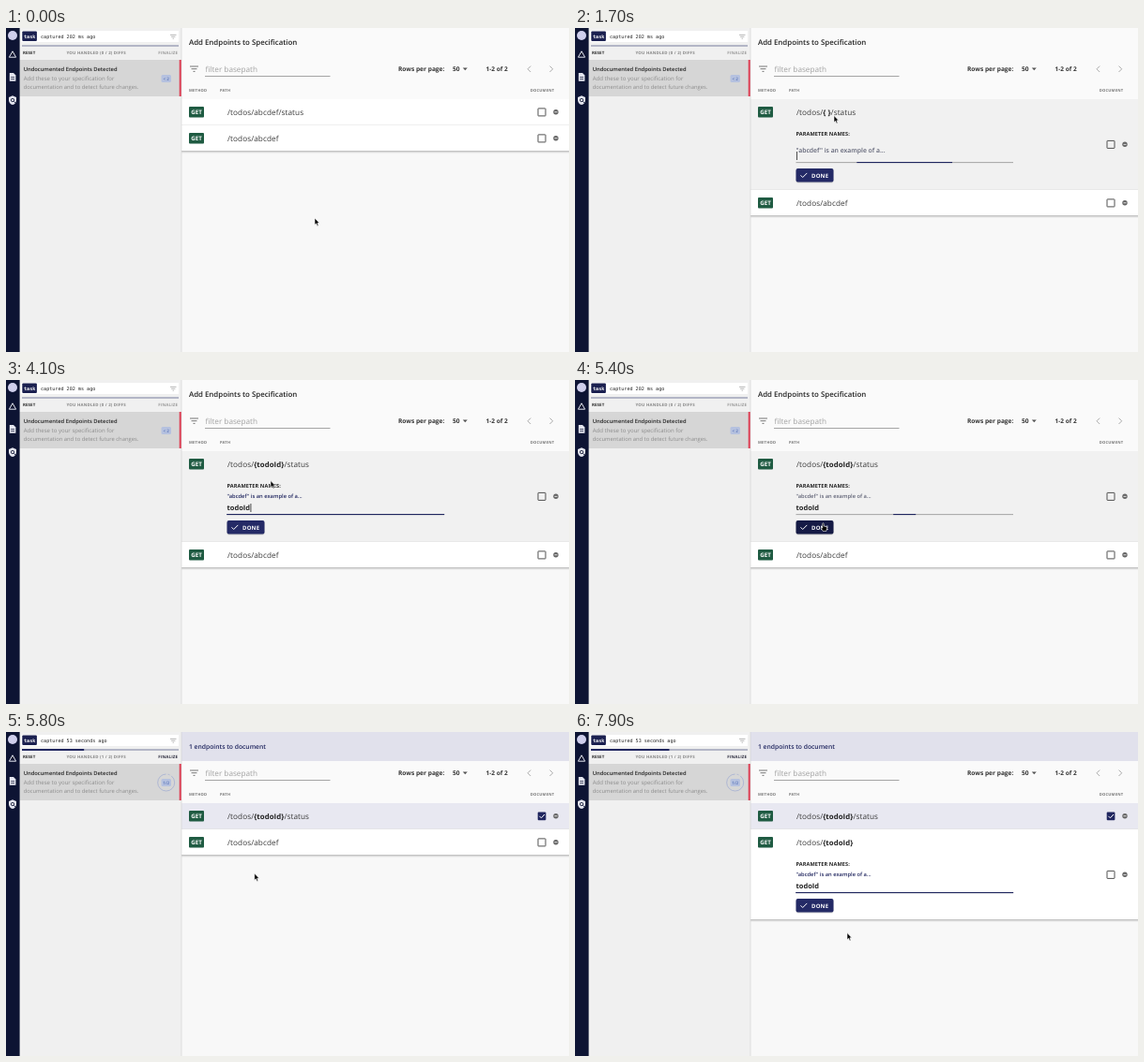
An HTML page that plays this animation: 600 px wide and 346 px high, repeating every 8000 ms.

```html
<!DOCTYPE html>
<html lang="en">
<head>
<meta charset="utf-8">
<title>Add endpoints</title>
<style>
html, body { margin: 0; width: 100%; height: 100%; overflow: hidden; }
svg { display: block; width: 600px; height: 346px; text-rendering: geometricPrecision;
  font-family: "Open Sans", "Noto Sans", sans-serif; }
.mono { font-family: "DejaVu Sans Mono", monospace; }
text { white-space: pre; }
</style>
</head>
<body>
<svg id="stage" viewBox="0 0 600 346"></svg>
<script>
const stage = document.getElementById('stage');
const NAVY = '#20265f', INK = '#2b2b2b', GREY = '#8c8c8c';

// When things happen, in ms
const OPEN1 = 1667, BLUR = 5282, SAVE = 5483, OPEN2 = 6967;
const KEYS = [2500, 2700, 2900, 3000, 3300, 3700];
const NAME = 'todoId';
const PATH = [[200, 329, 203], [900, 276, 93.5], [3800, 276, 93.5], [4100, 282, 107.5],
  [5200, 264, 153], [5700, 265, 154], [6300, 262, 114], [6950, 262, 114], [7900, 290, 214.5]];

const clamp = v => Math.max(0, Math.min(1, v));
const mix = (a, b, p) => a + (b - a) * p;

// cubic-bezier(0, 0, .2, 1)
function easeOut(x) {
  x = clamp(x);
  let lo = 0, hi = 1;
  for (let i = 0; i < 20; i++) {
    const s = (lo + hi) / 2;
    if (.6 * (1 - s) * s * s + s ** 3 < x) lo = s; else hi = s;
  }
  return 3 * (1 - lo) * lo * lo + lo ** 3;
}

function pointer(t) {
  let [t0, x0, y0] = PATH[0];
  for (const [t1, x1, y1] of PATH) {
    if (t < t1) {
      const p = clamp((t - t0) / (t1 - t0)), e = p * p * (3 - 2 * p);
      return [mix(x0, x1, e), mix(y0, y1, e)];
    }
    [t0, x0, y0] = [t1, x1, y1];
  }
  return [x0, y0];
}

const rect = (x, y, w, h, fill, more = '') =>
  `<rect x="${x}" y="${y}" width="${w}" height="${h}" fill="${fill}" ${more}/>`;
const line = (d, stroke, w = 1) => `<path d="${d}" fill="none" stroke="${stroke}" stroke-width="${w}"/>`;
const text = (x, y, size, s, fill = INK, weight = 400, more = '') =>
  `<text x="${x}" y="${y}" font-size="${size}" fill="${fill}" font-weight="${weight}" ${more}>${s}</text>`;
const spaced = n => `letter-spacing="${n}"`;
const filterIcon = (x, y, w, c) =>
  line(`M${x} ${y}h${w}M${x + w * .17} ${y + w * .3}h${w * .66}M${x + w * .39} ${y + w * .6}h${w * .22}`, c, w / 9);

function sidebar() {
  return rect(0, 0, 14.6, 346, '#0d1433') +
    '<circle cx="7" cy="8" r="5" fill="#cfcfec"/>' +
    line('M7 24.8L10.6 31.2H3.4Z', '#e4e6ef', 1) +
    '<path d="M3.8 48h4.2l2.4 2.4v6.4h-6.6z" fill="#e4e6ef"/>' + line('M5.2 52.5h3.8M5.2 54.5h3.8', '#0d1433', .7) +
    '<path d="M7 72.2l4 1.7v3c0 2.6-1.7 4.4-4 5.2c-2.3-.8-4-2.6-4-5.2v-3z" fill="#e4e6ef"/>' +
    '<circle cx="7" cy="77" r="1.7" fill="none" stroke="#0d1433" stroke-width=".8"/>' + line('M8.2 78.2l1.8 1.8', '#0d1433', .8);
}

function diffs(t) {
  const saved = t >= SAVE, done = clamp((t - SAVE) / 400);
  let s = rect(14, 0, 173, 346, '#f0f0f0') + rect(16, 3, 168, 12, '#fff') +
    rect(17.3, 3.6, 15.6, 10.4, '#1b2050', 'rx="1"') +
    text(19, 10.6, 5.1, 'task', '#fff', 700, 'class="mono"') +
    text(37, 10.8, 5.1, `captured ${saved ? '53 seconds' : '202 ms'} ago`, '#222', 400, 'class="mono"') +
    filterIcon(175, 7.3, 6.5, '#9a9a9a') +
    rect(17, 18, 167, 2, '#b3b6c6') + rect(17, 18, 83.5 * done, 2, NAVY) +
    text(18, 28, 4.4, 'RESET', '#2a2a2a', 700, spaced(.1)) +
    text(64.5, 28, 4.4, `YOU HANDLED (${+saved} / 2) DIFFS`, '#858585', 700, spaced(.2)) +
    text(162.3, 28, 4.4, 'FINALIZE', saved ? '#2a2a3c' : '#9a9a9a', 700, spaced(.18)) +
    rect(14, 34, 173, 39, '#d6d6d6') + rect(184.7, 34, 2.3, 39, '#df3f55') +
    text(18.7, 46, 5.8, 'Undocumented Endpoints Detected', '#222', 600) +
    text(18.7, 56, 6.05, 'Add these to your specification for', GREY) +
    text(18.7, 65.3, 5.82, 'documentation and to detect future changes.', GREY);
  if (saved) s += '<circle cx="170.7" cy="54" r="9" fill="none" stroke="#aab4d3" stroke-width=".9" stroke-dasharray="42 2 2 2"/>';
  s += rect(165.5, 50, 10.5, 8, '#b5c1df', 'rx="1.5"') +
    text(170.7, 55.8, 4.6, saved ? '1/2' : '&lt; 2', '#5a74b8', 600, 'text-anchor="middle"');
  return s;
}

function toolbar(t) {
  const tint = clamp((t - SAVE) / 300), saved = t >= SAVE;
  return rect(187, 0, 413, 346, '#f8f8f8') + rect(187, 0, 413, 76, '#fafafa') +
    rect(187, 0, 413, 31, '#e1e1ec', `opacity="${tint}"`) +
    (saved ? text(195, 18, 6.75, '1 endpoints to document', NAVY, 600)
           : text(195, 18, 7.85, 'Add Endpoints to Specification', '#222', 600)) +
    filterIcon(196, 41, 9, '#777') +
    text(212.5, 46.9, 8.2, 'filter basepath', '#a2a2a2') + rect(212, 51, 133.5, .8, '#8f8f8f') +
    text(418, 46.2, 6.6, 'Rows per page:', '#333', 700) +
    text(476, 46.2, 6.6, '50', '#333', 700) + '<path d="M486.8 42.6h5l-2.5 2.7z" fill="#555"/>' +
    text(511.5, 46.2, 6.5, '1-2 of 2', '#333', 700) +
    line('M559.2 40.6L556 43.8L559.2 47', '#ababab') + line('M579.5 40.6L582.7 43.8L579.5 47', '#ababab') +
    text(195, 67.8, 4.1, 'METHOD', '#777', 700, spaced(.22)) +
    text(228, 67.8, 4.1, 'PATH', '#777', 700, spaced(.22)) +
    text(558.7, 67.8, 4.1, 'DOCUMENT', '#777', 700, spaced(.22));
}

// Form for naming the parameter, y is the top of its row
function form(y, f) {
  const size = mix(7.7, 5.75, f.shrink), base = mix(63, 50.3, f.shrink);
  const shown = 232 * f.bar;
  return text(235.5, y + 39.2, 5.6, 'PARAMETER NAMES:', '#262626', 700, spaced(.08)) +
    text(235.5, y + base, size, '"abcdef" is an example of a...', f.focus && f.shrink > .5 ? NAVY : '#5f6275', 600) +
    `<text x="235.5" y="${y + 63.3}" font-size="7.5" font-weight="700" fill="#222">${f.value}</text>` +
    rect(235.5, y + 67.3, 231.5, .8, '#909090') +
    rect(351.2 - shown / 2, y + 67, shown, 1.1, NAVY) +
    (f.caret ? rect(236 + f.caretX, y + 56, .8, 9, '#222') : '') +
    rect(235.5, y + 75, 40, 14.5, '#00000028', 'rx="2"') +
    rect(235.5, y + 74, 40, 14.5, f.hot ? '#151a45' : '#242a66', 'rx="2"') +
    line(`M240.5 ${y + 81.3}l2.2 2.2l4.6 -4.6`, '#fff') +
    text(252, y + 83.5, 6, 'DONE', '#fff', 700, spaced(.2));
}

function row(y, h, r) {
  const c = y + h / 2;
  const param = r.param == null ? 'abcdef'
    : `<tspan font-size="7.8" font-weight="700" fill="${r.flash ? '#c8324a' : '#222'}">{${r.param || ' '}}</tspan>`;
  return rect(187, y, 413, h, r.checked ? '#e8e8f1' : r.hover ? '#f1f1f1' : '#fff') +
    rect(187, y + h - .5, 413, .5, '#dedede') +
    rect(195, y + 8.1, 16, 11.4, '#1f5b42', 'rx="1"') +
    text(203, y + 16.2, 6.2, 'GET', '#fff', 700, 'text-anchor="middle"') +
    text(236, y + 16.8, 8.2, `/todos/${param}${r.tail}`, '#3a3a3a', 400, spaced(.07)) +
    (r.form ? form(y, r.form) : '') +
    (r.checked
      ? rect(566.7, c - 4.4, 8.7, 8.7, NAVY, 'rx="1"') + line(`M568.4 ${c - .2}l2 2l3.6 -3.8`, '#fff')
      : rect(567, c - 4.1, 8, 8, 'none', 'rx=".4" stroke="#505050"')) +
    `<circle cx="586" cy="${c - .2}" r="2.7" fill="#666"/>` + rect(584.5, c - .6, 3, .8, '#fff');
}

function mouse(t, x, y, hand) {
  if (t >= KEYS[0] && t < 3900) return '';
  return `<path transform="translate(${x} ${y})" stroke="#fff" stroke-width=".6" fill="#000" d="` +
    (hand ? 'M-.6 0q.8-.9 1.4 0v2.6l2.6.8q1 .4.8 1.6l-.7 3h-3.6l-2.2-3.2q.2-1.2 1.7 0z'
          : 'M0 0V7.2L1.6 5.8L2.8 8.5L4 8L2.9 5.3H5Z') + '"/>';
}

let charW = [];
function measure() {
  stage.innerHTML = '<text font-size="7.5" font-weight="700">' + NAME + '</text>';
  const el = stage.firstChild;
  charW = [0, ...[...NAME].map((_, i) => el.getSubStringLength(0, i + 1))];
}

function draw(t) {
  const [x, y] = pointer(t), saved = t >= SAVE;
  const open1 = t >= OPEN1 && !saved, open2 = t >= OPEN2;
  const h1 = open1 ? 97 : 28, h2 = open2 ? 97 : 28, top2 = 76 + h1, end = top2 + h2;
  const typed = KEYS.filter(k => t >= k).length;
  const lastKey = typed ? KEYS[typed - 1] : OPEN1;
  const hot = open1 && x > 235 && x < 276 && y > 149 && y < 165;
  const blink = since => (t - since) % 1000 < 500;

  const form1 = open1 && {
    value: NAME.slice(0, typed), focus: t < BLUR, hot,
    shrink: easeOut((t - OPEN1) / 200),
    bar: t < BLUR ? easeOut((t - OPEN1) / 200) : 1 - easeOut((t - BLUR) / 200),
    caret: t < BLUR && blink(lastKey), caretX: charW[typed]
  };
  const form2 = open2 && {
    value: NAME, focus: true, shrink: 1, bar: easeOut((t - OPEN2) / 200),
    caret: blink(OPEN2), caretX: charW[NAME.length]
  };

  stage.innerHTML = toolbar(t) +
    row(76, h1, {
      param: t >= OPEN1 ? NAME.slice(0, typed) : null, tail: '/status',
      flash: typed && t - lastKey < 100, checked: saved, form: form1, hover: y > 76 && y < top2
    }) +
    row(top2, h2, { param: open2 ? NAME : null, tail: '', form: form2, hover: y > top2 && y < end }) +
    rect(187, end - .6, 413, 1.1, '#a9a9a9') + rect(187, end + .5, 413, 1, '#e6e6e6') +
    diffs(t) + rect(186.7, 0, .6, 346, '#d2d2d2') + sidebar() + mouse(t, x, y, hot);
}

// The screen refreshes ten times a second
let last = -1;
function tick() {
  const step = Math.floor(performance.now() % 8000 / 100) * 100;
  if (step !== last) draw(last = step);
  requestAnimationFrame(tick);
}
measure();
tick();
</script>
</body>
</html>
```
